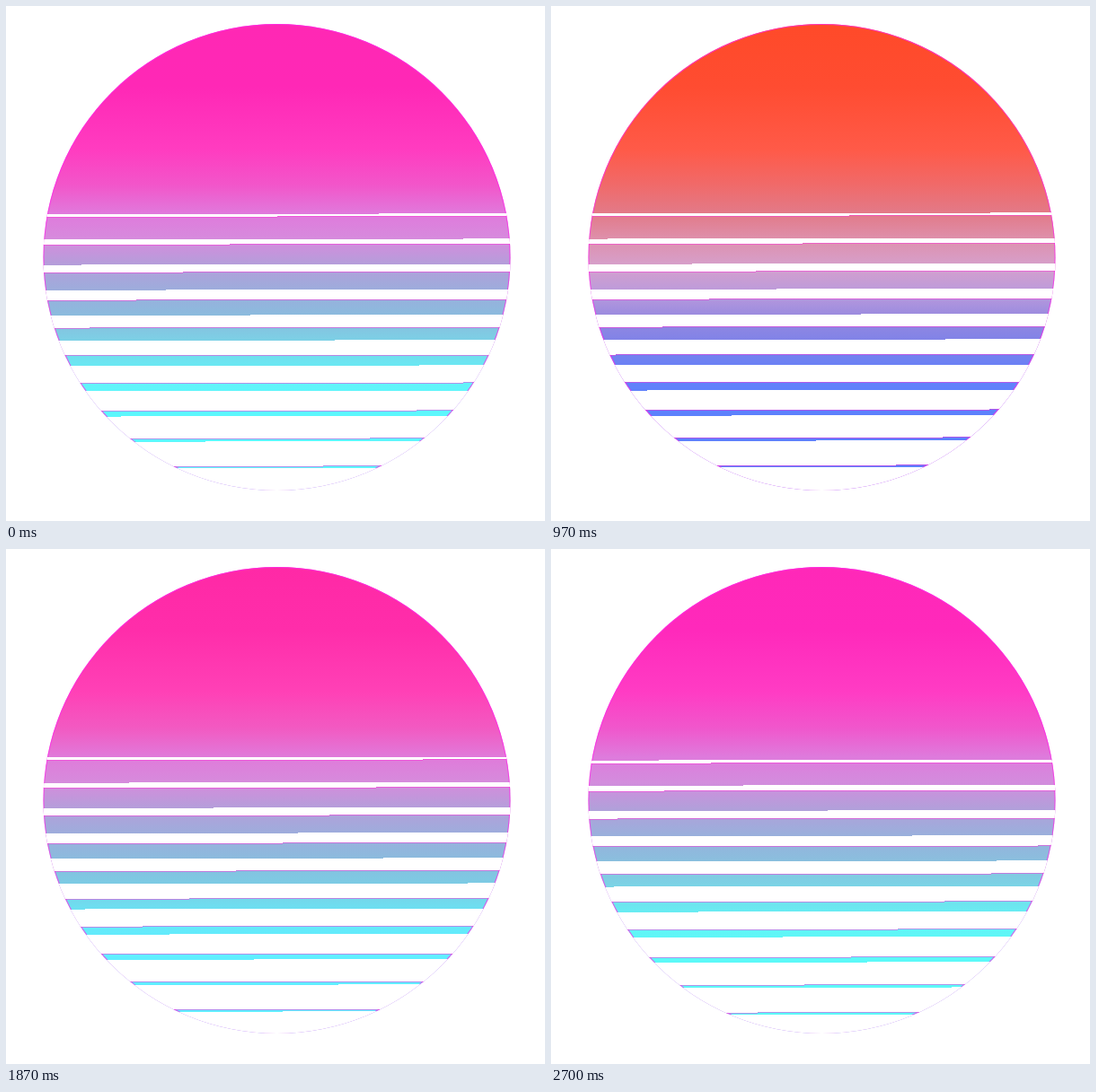
An HTML page with a canvas for the animation above (2730 ms loop, 600x574 px).

```html
<!DOCTYPE html>
<html lang="en">
<head>
<meta charset="utf-8">
<title>Striped sun</title>
<style>
  html, body { margin: 0; width: 100%; height: 100%; overflow: hidden; background: #fff; }
  canvas { display: block; }
</style>
</head>
<body>
<canvas id="stage" width="600" height="574"></canvas>
<script>
const ctx = document.getElementById('stage').getContext('2d');
const LOOP = 2730;
const SUN = { x: 301.5, y: 280, r: 260 };
const SPACING = 30.9;
const SPEED = 1.098;      // pixels per step, upwards
const FIRST_BAR = 234.5;
const FIRST_GAP = 217;    // gaps above this height stay closed

// Gradient colours from top to bottom at each key time.
const STOPS = [20, 90, 160, 200, 232, 260, 290, 320, 350, 380, 410, 440];
const PALETTES = [
  [0, 'ff28b4 ff28b6 ff3cc0 f256ca e07adc d68bdd b29fda 9aaedc 88bede 78d6e8 64f0f8 5cf8fc'],
  [630, 'ff2850 ff2c56 ff426c f0608e e07cb0 de90ca cca0dc a29ae0 8c98e0 78a6e6 60b0f6 5cb0fc'],
  [970, 'ff4a28 ff4c30 ff5a48 f06a6a e27a88 de90ac d6a0cc ba9adc 9488e0 7a80ea 6480fa 5c80fc'],
  [1530, 'ff6028 ff6434 ff6a48 f07060 e07a80 de8ea8 d8a0cc c49cdc 9c8ae0 7c76e4 5e6efa 5c68fc'],
  [1870, 'ff28a8 ff2cac ff40b8 f25ac4 e07adc d68bdd b29fda 9aaedc 88bede 78d2e6 68e8f6 60f0ff'],
  [2270, 'ff28e8 fc30fa ff38f2 da66e8 c682dc b294dc a0a8dc 90c6dc 88e0e0 76ead8 60ffd4 58ffc8'],
  [LOOP, 'ff28b4 ff28b6 ff3cc0 f256ca e07adc d68bdd b29fda 9aaedc 88bede 78d6e8 64f0f8 5cf8fc']
].map(([time, list]) => ({
  time,
  colors: list.split(' ').map(hex => [0, 2, 4].map(i => parseInt(hex.slice(i, i + 2), 16)))
}));

function sunGradient(time) {
  const next = PALETTES.findIndex(p => p.time > time);
  const a = PALETTES[next - 1], b = PALETTES[next];
  const mix = (time - a.time) / (b.time - a.time);
  const gradient = ctx.createLinearGradient(0, 20, 0, 540);
  STOPS.forEach((y, i) => {
    const rgb = a.colors[i].map((v, c) => Math.round(v + (b.colors[i][c] - v) * mix));
    gradient.addColorStop((y - 20) / 520, `rgb(${rgb})`);
  });
  return gradient;
}

// A slightly tilted edge snapped to whole pixels: one step, higher on the right.
function tiltedEdge(y) {
  const left = Math.round(y + 0.5);
  const step = Math.round(SUN.x + 520 * (y - left + 0.5));
  return [[0, left], [step, left], [step, left - 1], [600, left - 1]];
}

function fillBetween(top, bottom, color) {
  ctx.beginPath();
  [...top, ...bottom.slice().reverse()].forEach(([x, y]) => ctx.lineTo(x, y));
  ctx.fillStyle = color;
  ctx.fill();
}

const barHeight = top => Math.max(2.6, 26.5 - (top - 222) * 0.088);

function draw(step) {
  ctx.fillStyle = '#fff';
  ctx.fillRect(0, 0, 600, 574);

  ctx.save();
  ctx.beginPath();
  ctx.arc(SUN.x, SUN.y, SUN.r, 0, Math.PI * 2);
  ctx.fillStyle = sunGradient(step * LOOP / 82);
  ctx.fill();
  ctx.clip();
  ctx.strokeStyle = 'rgba(255, 40, 235, 0.75)';
  ctx.lineWidth = 2;
  ctx.stroke();

  const shift = (step * SPEED) % SPACING;
  for (let top = FIRST_BAR - shift; top < 580; top += SPACING) {
    const barTop = tiltedEdge(top);
    const gapTop = tiltedEdge(top - SPACING + barHeight(top - SPACING));
    if (top < FIRST_GAP) {
      if (top > 208) fillBetween(tiltedEdge(top - 2), tiltedEdge(top + 2), 'rgba(110, 70, 120, 0.14)');
      continue;
    }
    fillBetween(barTop, barTop.map(([x, y]) => [x, y + 1]), 'rgba(255, 50, 220, 0.5)');
    fillBetween(gapTop, barTop, '#fff');
  }
  ctx.restore();
}

function tick() {
  const time = performance.now() % LOOP;
  draw(Math.min(81, Math.floor(time * 0.03 + 0.15)));
  requestAnimationFrame(tick);
}
tick();
</script>
</body>
</html>
```
